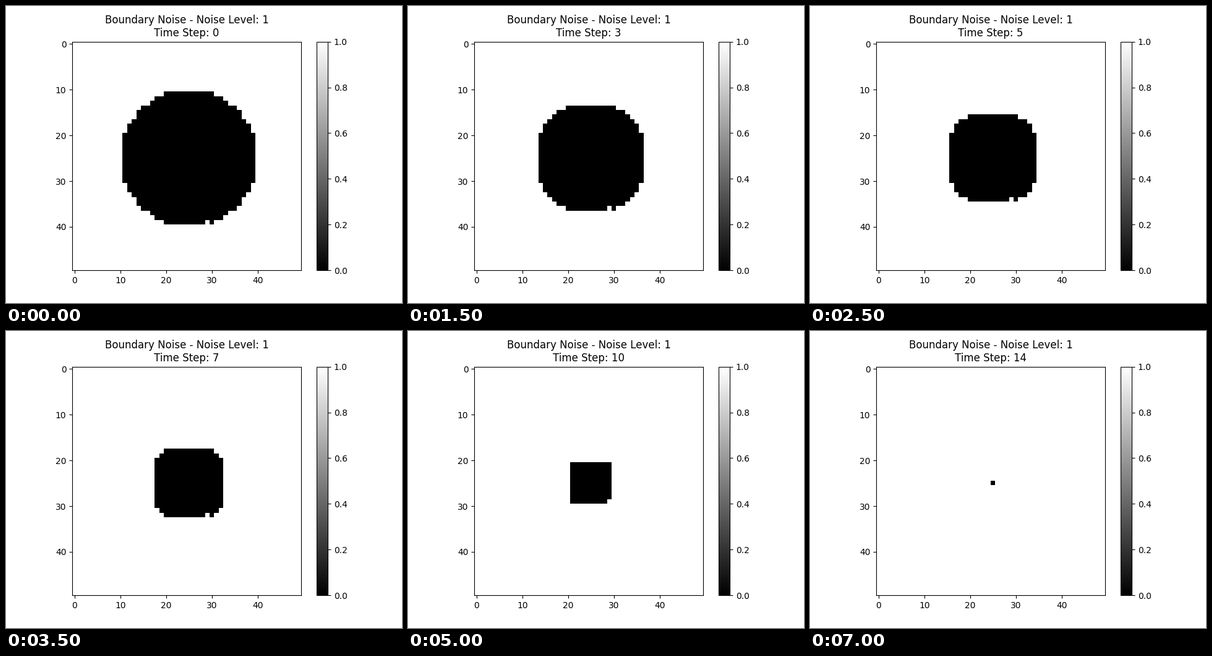
Recreate the animation shown at these times as a matplotlib script. Size 640x480 px, loop 7.5 s.

```python
import matplotlib.pyplot as plt
import numpy as np
from matplotlib.animation import FuncAnimation

SIZE, CENTER, RADIUS = 50, 25, 15
STEPS, INTERVAL = 15, 500


def initial_shape():
    y, x = np.indices((SIZE, SIZE)) - CENTER
    shape = x**2 + y**2 < RADIUS**2
    shape[39, 29] = False  # the single noisy boundary cell
    return shape


def erode(shape):
    """Keep the cells whose four direct neighbours are all filled."""
    result = shape.copy()
    for axis in (0, 1):
        for shift in (-1, 1):
            result &= np.roll(shape, shift, axis)
    return result


shapes = [initial_shape()]
while len(shapes) < STEPS:
    shapes.append(erode(shapes[-1]))

fig, ax = plt.subplots(figsize=(6.4, 4.8), dpi=100)
image = ax.imshow(~shapes[0] * 1.0, cmap="gray", vmin=0, vmax=1,
                  interpolation="nearest")
fig.colorbar(image, ax=ax)
title = ax.set_title("")


def update(step):
    image.set_data(~shapes[step] * 1.0)
    title.set_text(f"Boundary Noise - Noise Level: 1\nTime Step: {step}")
    return image, title


anim = FuncAnimation(fig, update, frames=STEPS, interval=INTERVAL,
                     init_func=lambda: update(0), repeat=True, repeat_delay=0)
plt.show()
```
